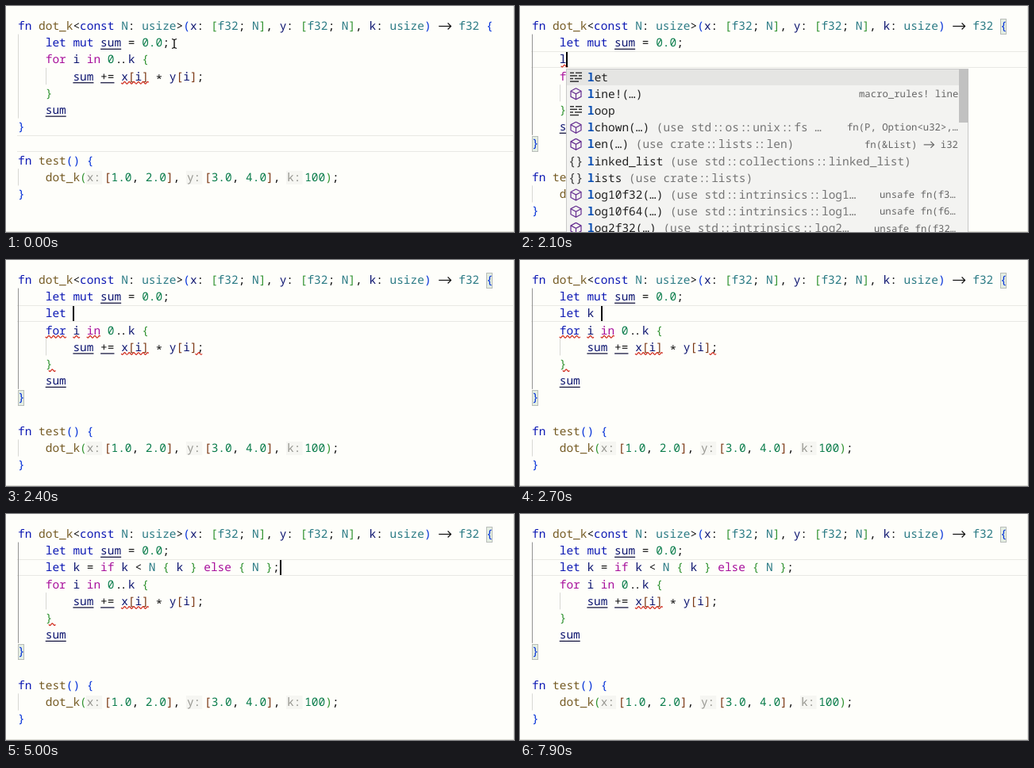
An HTML page with a canvas that plays this animation: 640 by 285 pixels, repeating every 8 s.

```html
<!DOCTYPE html>
<html lang="en">
<head>
<meta charset="utf-8">
<title>Code editor</title>
<style>
  html, body { margin: 0; width: 100%; height: 100%; overflow: hidden; background: #fefefa; }
  canvas { display: block; width: 640px; height: 285px; }
</style>
</head>
<body>
<canvas id="stage"></canvas>
<script>
const W = 640, H = 285, LOOP = 8000;
const LEFT = 15, SIZE = 14.46, CELL = SIZE * 0.6, ROW = 21.2, SMALL = 12.28;
const FACE = '"Noto Sans Mono", "DejaVu Sans Mono", monospace';

const canvas = document.getElementById('stage');
const ctx = canvas.getContext('2d');
const dpr = window.devicePixelRatio || 1;
canvas.width = W * dpr;
canvas.height = H * dpr;
ctx.scale(dpr, dpr);
ctx.textRendering = 'geometricPrecision';

const INK = '#111111', RED = '#d02a1c', KEYWORD = '#0c18b4';
const PAIRS = ['#0431d8', '#319331', '#7b3814'];
const KINDS = [
  [/^(fn|const|let|mut)$/, KEYWORD],
  [/^(for|in|if|else)$/, '#a8109c'],
  [/^(f32|usize|N)$/, '#2a7a84'],
  [/^(dot_k|test)$/, '#755b24'],
  [/^\d/, '#0b7d4c'],
  [/^\w/, '#0c1470']
];
const TOKEN = /«..»|->|\.\.|::|\d+(?:\.\d+)?|\w+|\s+|[^\s\w]/g;

// Text on the typed line, by time
const TYPED = [
  [1700, ''], [1900, 'l'], [2200, 'le'], [2300, 'let'], [2400, 'let '],
  [2500, 'let k'], [2700, 'let k '], [2800, 'let k ='], [3000, 'let k = ']
];
const CLICK = 400, END_KEY = 800, POPUP = 2000, BROKEN = 2400, MENDED = 2900;
const GHOST_AT = 3500, ACCEPT = 5000, CLEAN = 5200;
const GHOST = 'if k < N { k } else { N };';

const HEAD = ['fn dot_k<const N: usize>(x: [f32; N], y: [f32; N], k: usize) -> f32 {', '    let mut sum = 0.0;'];
const TAIL = [
  '    for i in 0..k {', '        sum += x[i] * y[i];', '    }', '    sum', '}', '',
  'fn test() {', '    dot_k(«x:»[1.0, 2.0], «y:»[3.0, 4.0], «k:»100);', '}'
];

const ITEMS = [
  ['key', 'let'],
  ['cube', 'line!(…)', '', 'macro_rules! line', 427],
  ['key', 'loop'],
  ['cube', 'lchown(…)', '(use std::os::unix::fs …', 'fn(P, Option<u32>,…', 412],
  ['cube', 'len(…)', '(use crate::lists::len)', 'fn(&List) -> i32', 434],
  ['mod', 'linked_list', '(use std::collections::linked_list)'],
  ['mod', 'lists', '(use crate::lists)'],
  ['cube', 'log10f32(…)', '(use std::intrinsics::log1…', 'unsafe fn(f3…', 453],
  ['cube', 'log10f64(…)', '(use std::intrinsics::log1…', 'unsafe fn(f6…', 453],
  ['cube', 'log2f32(…)', '(use std::intrinsics::log2…', 'unsafe fn(f32…', 446]
];

const mid = row => 25 + row * ROW;
const colX = col => LEFT + col * CELL;

function rect(x, y, w, h, color) {
  ctx.fillStyle = color;
  ctx.fillRect(x, y, w, h);
}

function path(points, color, width = 1) {
  ctx.beginPath();
  points.forEach(([x, y], i) => i ? ctx.lineTo(x, y) : ctx.moveTo(x, y));
  ctx.strokeStyle = color;
  ctx.lineWidth = width;
  ctx.stroke();
}

function arrow(x, y, w, color) {
  const tip = x + w - 1;
  path([[x + 1, y], [tip, y]], color, 1.2);
  path([[tip - 4, y - 4], [tip, y], [tip - 4, y + 4]], color, 1.2);
}

// Draws on a fixed cell grid, with joined forms of -> .. and ::
function put(text, x, y, color, size = SIZE, style = '') {
  const cell = size * 0.6;
  ctx.font = `${style} ${size}px ${FACE}`;
  ctx.fillStyle = color;
  for (const part of text.match(/->|\.\.|::|./g) || []) {
    if (part === '->') arrow(x, y + 0.5, cell * 2, color);
    else {
      const pull = part.length > 1 ? 1.3 : 0;
      [...part].forEach((ch, i) =>
        ctx.fillText(ch, x + i * cell + (i ? -pull : pull), y + size * 0.35 + (ch === '*' ? 3 : 0)));
    }
    x += cell * part.length;
  }
  return x;
}

function code(lines, broken) {
  let depth = 0;
  lines.forEach((line, row) => {
    let x = LEFT;
    const y = mid(row);
    for (const tok of line.match(TOKEN) || []) {
      if (tok[0] === '«') {
        rect(x - 1, y - 8, CELL * 2 + 3, 17, '#f6f6f2');
        x = put(tok.slice(1, 3), x, y, '#969690') + 4.7;
        continue;
      }
      let color = INK;
      const kind = KINDS.find(k => k[0].test(tok));
      if (broken && tok === 'for') color = KEYWORD;
      else if (kind) color = kind[1];
      else if ('([{'.includes(tok)) color = PAIRS[depth++ % 3];
      else if (')]}'.includes(tok)) color = PAIRS[--depth % 3];
      x = put(tok, x, y, color);
    }
  });
}

function underline(row, col, n) {
  rect(colX(col), mid(row) + 7.5, n * CELL, 1.3, '#1c1c44');
}

function squiggle(row, col, n, shift = 0) {
  const x = colX(col) + shift, y = mid(row) + 8.2, pts = [];
  for (let d = 0; d <= n * CELL; d += 0.5) pts.push([x + d, y + 1.3 * Math.sin(d * Math.PI / 2.9)]);
  path(pts, RED, 1.2);
}

function guide(x, from, to, active) {
  const top = mid(from) - ROW / 2;
  rect(x, top, 1, (to - from) * ROW, active ? '#939393' : '#d8d8d4');
}

function bracketBox(row, col) {
  const x = Math.round(colX(col)), y = Math.round(mid(row) - 9.5);
  rect(x, y, 8, 20, '#b9bdb9');
  rect(x + 1, y + 1, 6, 18, '#e4eee2');
}

function icon(kind, y) {
  if (kind === 'mod') return put('{}', 61, y, '#3c3c3c', 15.5);
  if (kind === 'key') {
    const bars = [[63, 5], [70, 8], [63, 9], [74, 4], [63, 4], [69, 9], [63, 11]];
    bars.forEach(([x, w], i) => rect(x, y - 6 + Math.floor(i / 2) * 3.6, w, 1.5, '#333333'));
    return;
  }
  const x = 70.5, c = '#652d90';
  path([[x, y - 7], [x + 6.5, y - 3.5], [x + 6.5, y + 3.5], [x, y + 7], [x - 6.5, y + 3.5], [x - 6.5, y - 3.5], [x, y - 7]], c, 1.2);
  path([[x - 6.5, y - 3.5], [x, y], [x + 6.5, y - 3.5]], c, 1.2);
  path([[x, y], [x, y + 7]], c, 1.2);
}

function popup(prefix) {
  rect(58, 79, 507, H - 79, '#c8c8c8');
  rect(59, 80, 505, H - 80, '#f3f3f1');
  rect(59, 80, 505, 20, '#e5e5e3');
  ITEMS.forEach(([kind, name, use, detail, dx], i) => {
    const y = mid(3 + i) + 1;
    icon(kind, y);
    let n = 0;
    while (n < prefix.length && name[n] === prefix[n]) n++;
    let x = put(name.slice(0, n), 85, y, '#0a4fb4', SIZE, 'bold');
    x = put(name.slice(n), x, y, '#222222');
    if (use) put(use, x + CELL, y, '#757575');
    if (detail) put(detail, dx, y, '#666666', SMALL);
  });
  rect(553, 80, 12, 67, '#c1c1c1');
}

function pointer(x, y) {
  path([[x - 3, y - 6], [x, y - 5], [x + 3, y - 6]], INK, 1.2);
  path([[x, y - 5], [x, y + 5]], INK, 1.4);
  path([[x - 3, y + 6], [x, y + 5], [x + 3, y + 6]], INK, 1.2);
}

function draw(t) {
  const clicked = t >= CLICK;
  const step = TYPED.filter(s => s[0] <= t).pop();
  const accepted = t >= ACCEPT;
  const broken = t >= BROKEN && t < MENDED;
  const word = step ? step[1] + (accepted ? GHOST : '') : '';
  const add = step ? 1 : 0;
  const current = clicked ? 1 + add : 7;
  const lines = [...HEAD, ...(step ? ['    ' + word] : []), ...TAIL];

  rect(0, 0, W, H, '#fefefa');
  rect(W - 1, 0, 1, H, '#e4e4de');
  rect(0, H - 1, W, 1, '#dcdcd4');

  const top = Math.round(mid(current) - ROW / 2);
  rect(14, top, W - 14, 1, '#e9e9e4');
  rect(14, top + 20, W - 14, 1, '#e9e9e4');

  guide(15, 1, 6 + add, clicked);
  guide(50, 3 + add, 4 + add);
  guide(15, 9 + add, 10 + add);
  if (clicked) {
    bracketBox(0, 68);
    bracketBox(6 + add, 0);
  }

  code(lines, broken);
  underline(1, 12, 3);
  underline(3 + add, 8, 3);
  underline(3 + add, 12, 2);
  underline(5 + add, 4, 3);
  squiggle(3 + add, 15, 4);

  if (t >= POPUP && t < BROKEN) squiggle(2, 4, 1, 2);
  if (broken) {
    squiggle(3, 4, 3);
    squiggle(3, 8, 1);
    squiggle(3, 10, 2);
    squiggle(4, 26, 1, -2);
  }
  if (t >= BROKEN && t < CLEAN) squiggle(5, 4, 1, 4.2);
  if (t >= GHOST_AT && !accepted) put(GHOST, colX(12), mid(2), '#8a8a84', SIZE, 'italic');
  if (t >= POPUP && t < BROKEN) popup(word);

  if (clicked) {
    const last = accepted ? ACCEPT : step ? step[0] : t >= END_KEY ? END_KEY : CLICK;
    const col = step ? 4 + word.length : HEAD[1].length;
    if ((t - last) % 1000 < 500) rect(Math.round(colX(col)), top + 1, 2, 19, '#000');
  }
  if (t < END_KEY) pointer(212, 47.5);
}

const start = performance.now();
function tick() {
  const t = (performance.now() - start) % LOOP;
  draw(Math.floor(t / 100) * 100);
  requestAnimationFrame(tick);
}
tick();
</script>
</body>
</html>
```
